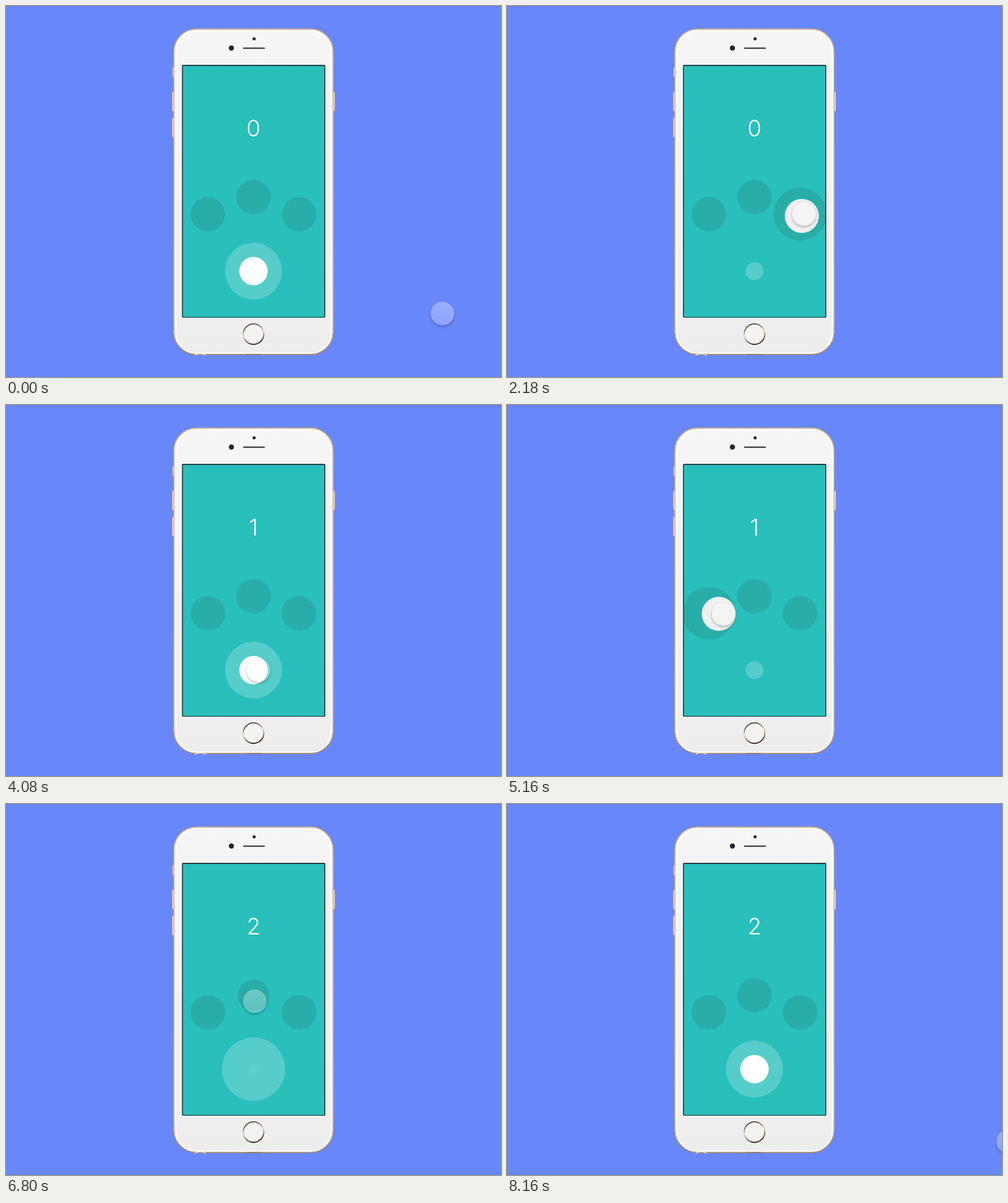
An HTML page for the animation above (8180 ms loop, 800 px wide and 600 px high).

```html
<!DOCTYPE html>
<html lang="en">
<head>
<meta charset="utf-8">
<title>Drag and drop counter</title>
<style>
  html, body { margin: 0; width: 100%; height: 100%; overflow: hidden; background: #6887fa; }
  #stage { position: relative; width: 800px; height: 600px; overflow: hidden; }
  svg { position: absolute; inset: 0; }
  #count { font: 300 37px Inter, "Open Sans", sans-serif; fill: #fff; text-anchor: middle; }
  #cursor {
    position: absolute; left: -19px; top: -19px; width: 38px; height: 38px; border-radius: 50%;
    background: linear-gradient(rgba(255,255,255,.33), rgba(255,255,255,.24));
    box-shadow: 0 2px 4px rgba(0,0,0,.28), inset 0 0 1px rgba(255,255,255,.3);
  }
</style>
</head>
<body>
<div id="stage">
  <svg width="800" height="600" viewBox="0 0 800 600">
    <defs>
      <linearGradient id="face" x2="0" y2="1">
        <stop stop-color="#f6f6f6"/><stop offset=".14" stop-color="#f4f4f4"/>
        <stop offset=".85" stop-color="#f0f0f0"/><stop offset="1" stop-color="#ededed"/>
      </linearGradient>
      <linearGradient id="gold" x2="0" y2="1">
        <stop stop-color="#cdb08b"/><stop offset=".9" stop-color="#d3b690"/><stop offset="1" stop-color="#a98a62"/>
      </linearGradient>
      <linearGradient id="ring" x2=".3" y2="1">
        <stop stop-color="#2e211b"/><stop offset=".3" stop-color="#8d7462"/>
        <stop offset=".55" stop-color="#eadbcb"/><stop offset="1" stop-color="#3a2920"/>
      </linearGradient>
      <clipPath id="glass"><rect x="286" y="97" width="228.500" height="406"/></clipPath>
    </defs>
    <path d="M0 .5H800" stroke="#6480ec"/>
    <g fill="#f8ecdc" stroke="#c7a67c" stroke-width=".8">
      <rect x="269.300" y="99" width="3" height="16" rx="1"/>
      <rect x="268.800" y="139" width="3" height="31" rx="1"/>
      <rect x="268.800" y="181" width="3" height="31" rx="1"/>
      <rect x="528.200" y="139" width="3" height="31" rx="1"/>
    </g>
    <rect x="271.500" y="37.500" width="257" height="526" rx="36" fill="#fff" stroke="url(#gold)" stroke-width="1.800"/>
    <rect x="274.500" y="40.500" width="251" height="521" rx="33" fill="url(#face)" stroke="#fff" stroke-width="1.500"/>
    <path d="M271 527h3M526 527h3" stroke="#e3d5c3" stroke-width="3"/>
    <path d="M387 563.500h26" stroke="#8b7256" stroke-width="1.200"/>
    <path d="M305 565q9-5 18 0" fill="none" stroke="#fff" stroke-width="1.200"/>
    <circle cx="364.300" cy="68" r="4.200" fill="#25242c"/>
    <circle cx="401" cy="53" r="2.600" fill="#2a2930"/>
    <path d="M384 68.200h33.500" stroke="#2b2a2c" stroke-width="2" stroke-linecap="round"/>
    <circle cx="400" cy="530.700" r="16.600" fill="#f3f3f2" stroke="url(#ring)" stroke-width="1.900"/>
    <rect x="284.500" y="95.200" width="231.500" height="408.800" rx="1.500" fill="#162a2d"/>
    <rect x="286" y="97" width="228.500" height="406" fill="#29bfbb"/>
    <text id="count" x="400" y="211">0</text>
    <g clip-path="url(#glass)">
      <circle id="base" cx="400" cy="428.700" fill="#fff" fill-opacity=".21"/>
      <g id="targets" fill="#282828" fill-opacity=".12" stroke="#000" stroke-opacity=".04"></g>
      <circle id="knob" fill="#fff"/>
    </g>
  </svg>
  <div id="cursor"></div>
</div>
<script>
const LOOP = 8180, HOME = [400, 428.7], REST = 27.5;
const $ = id => document.getElementById(id);
const clamp = v => Math.min(1, Math.max(0, v));
const mix = (a, b, k) => a + (b - a) * k;

const sine = u => (1 - Math.cos(Math.PI * u)) / 2;
const quadOut = u => 1 - (1 - u) ** 2;
const cubicOut = u => 1 - (1 - u) ** 3;
const leave = u => u ** 2.5;
const backOut = u => 1 - 3.3 * (1 - u) ** 3 + 2.3 * (1 - u) ** 2;
const ramp = (t, start, length, ease) => ease(clamp((t - start) / length));

// Cursor path: start, end, x, y, easing, bend
const moves = [
  [0, 840, 403.5, 426, quadOut, 1],
  [1100, 1910, 480, 336.5, sine, 1.18],
  [2600, 3213, 408, 429, sine, 1],
  [4380, 5080, 350, 338, sine, 1],
  [5200, 5960, 402, 319, sine, 1],
  [6980, 8160, 810, 546, leave, 1]
];

const targets = [
  { at: [326.3, 336.8], hover: [4900, 5350] },
  { at: [400, 309.2], hover: [5850, 6540] },
  { at: [473.7, 336.8], hover: [1920, 2600] }
];

const drags = [
  { grab: 1100, drop: 2600, offset: [3.5, -3], to: targets[2].at },
  { grab: 4380, drop: 6540, offset: [7.8, 0.3], to: targets[1].at }
];

for (const target of targets) {
  target.node = document.createElementNS("http://www.w3.org/2000/svg", "circle");
  target.node.setAttribute("cx", target.at[0]);
  target.node.setAttribute("cy", target.at[1]);
  $("targets").append(target.node);
}

function cursorAt(t) {
  let x = 706, y = 497.5;
  for (const [start, end, toX, toY, ease, bend] of moves) {
    const k = ramp(t, start, end - start, ease);
    x = mix(x, toX, k ** bend);
    y = mix(y, toY, k ** (1 / bend));
  }
  return [x, y];
}

const swell = (t, [on, off]) => ramp(t, on, 250, quadOut) - ramp(t, off, 500, backOut);

function knobAt(t) {
  const drag = drags.findLast(d => t >= d.grab);
  if (!drag) return { at: HOME, r: 23, blur: 0, alpha: 1 };
  const { grab, drop, offset, to } = drag;
  const spawn = drop + 250;
  if (t >= spawn) {
    const u = clamp((t - spawn) / 260);
    return { at: HOME, r: 23 * cubicOut(u), blur: 6 * (1 - u), alpha: clamp(.4 + u * 2) };
  }
  const sink = ramp(t, drop, 180, quadOut);
  const held = cursorAt(Math.min(t, drop)).map((v, i) => v - offset[i]);
  return {
    at: held.map((v, i) => mix(v, to[i], sink)),
    r: mix(23, REST, ramp(t, grab, 280, quadOut)) * (1 - sink),
    blur: 0,
    alpha: 1 - sink
  };
}

function draw(t) {
  let baseRadius = 46, hovered = 0;
  for (const { grab, drop } of drags)
    baseRadius += 31.5 * (ramp(t, drop, 500, backOut) - ramp(t, grab, 280, quadOut));
  $("base").setAttribute("r", baseRadius);

  for (const { node, hover } of targets) {
    const k = swell(t, hover);
    node.setAttribute("r", REST + 15 * k);
    hovered = Math.max(hovered, clamp(k));
  }

  const knob = knobAt(t), shade = 255 - 15 * hovered;
  $("knob").setAttribute("cx", knob.at[0]);
  $("knob").setAttribute("cy", knob.at[1]);
  $("knob").setAttribute("r", knob.r);
  $("knob").style.fill = `rgb(${shade},${shade},${shade})`;
  $("knob").style.opacity = knob.alpha;
  $("knob").style.filter = knob.blur ? `blur(${knob.blur}px)` : "none";

  $("count").textContent = drags.filter(d => t >= d.drop).length;
  const [x, y] = cursorAt(t);
  $("cursor").style.transform = `translate(${x}px, ${y}px)`;
}

const began = performance.now();
function tick() {
  draw((performance.now() - began) % LOOP);
  requestAnimationFrame(tick);
}
tick();
</script>
</body>
</html>
```
